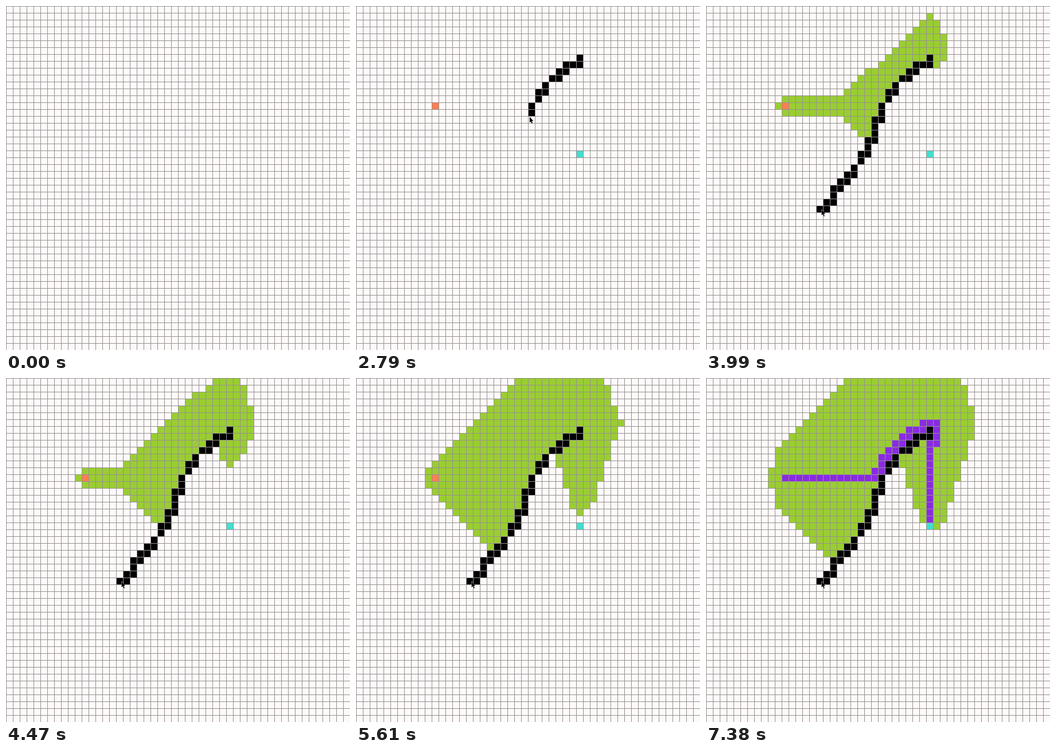
Write an HTML page that moves like this. It is 600 px wide and 600 px high and loops after 7410 ms.

```html
<!DOCTYPE html>
<html lang="en">
<head>
<meta charset="utf-8">
<title>Grid path search</title>
<style>
html, body { margin: 0; width: 100%; height: 100%; overflow: hidden; background: #fffafa; }
svg { display: block; width: 600px; height: 600px; }
</style>
</head>
<body>
<svg viewBox="0 0 600 600">
  <rect width="600" height="600" fill="#fffafa"/>
  <g shape-rendering="crispEdges">
    <path id="open" fill="#9acd32"/>
    <path id="route" fill="#8a2be2"/>
    <path id="wall" fill="#000"/>
    <path id="start" fill="#ff7f50"/>
    <path id="end" fill="#40e0d0"/>
    <path id="grid" fill="none" stroke="#959090"/>
  </g>
  <path id="cursor" d="M0 0V10L2.2 8.2L3.9 12L5.3 11.4L3.7 7.6H6.7Z"
    fill="#000" stroke="#fff" stroke-width=".8" paint-order="stroke"/>
</svg>
<script>
const LOOP = 7410, N = 50, S = 12;
const START_AT = 1140, END_AT = 1740, SEARCH_AT = 3510;
const DRAG = { from: 2430, to: 3260, top: 7, bottom: 29.58 };

const el = id => document.getElementById(id);
const key = (x, y) => y * N + x;
const mix = (a, b, p) => a + (b - a) * p;
const ease = p => { p = Math.min(1, Math.max(0, p)); return p * p * (3 - 2 * p); };
const START = key(11, 14), END = key(32, 21);

// the dragged stroke, in cells
const stroke = [[32.9, 7], [32.3, 8], [28, 11], [26, 14], [24, 19.5], [22, 23], [18.85, 27], [16.8, 29.58]];
function strokeX(y) {
  const i = Math.max(1, stroke.findIndex(p => p[1] >= y));
  const [a, b] = [stroke[i - 1], stroke[i]];
  return mix(a[0], b[0], (y - a[1]) / (b[1] - a[1]));
}

// wall cell -> height at which the stroke first touches it
const walls = new Map();
for (let y = DRAG.top + 1 / 16; y < DRAG.bottom; y += 1 / 8) {
  const n = key(Math.floor(strokeX(y)), Math.floor(y));
  if (!walls.has(n)) walls.set(n, y);
}
const dragY = t => mix(DRAG.top, DRAG.bottom, ease((t - DRAG.from) / (DRAG.to - DRAG.from)));

// Best-first search, ties in order of insertion; the heuristic weighs columns only
function search() {
  const g = new Map([[START, 0]]), from = new Map(), opened = new Map();
  const queue = [{ n: START, f: 0 }], queued = new Set([START]);
  let step = 0;
  while (queue.length) {
    let best = 0;
    queue.forEach((q, i) => { if (q.f < queue[best].f) best = i; });
    const n = queue.splice(best, 1)[0].n;
    queued.delete(n);
    if (n === END) break;
    step++;
    const x = n % N, y = Math.floor(n / N);
    for (const [dx, dy] of [[1, 0], [-1, 0], [0, 1], [0, -1]]) {
      const u = x + dx, v = y + dy, m = key(u, v);
      if (u < 0 || v < 0 || u >= N || v >= N || walls.has(m)) continue;
      const cost = g.get(n) + 1;
      if (g.has(m) && g.get(m) <= cost) continue;
      g.set(m, cost);
      from.set(m, n);
      if (queued.has(m)) continue;
      queue.push({ n: m, f: cost + 2 * Math.abs(u - END % N) });
      queued.add(m);
      if (!opened.has(m)) opened.set(m, step);
    }
  }
  const route = [];
  for (let n = END; from.has(n);) route.push(n = from.get(n));
  return { opened: [...opened], endOpen: opened.get(END), route, steps: step };
}
const found = search();

// pointer stops before the drag: arrive, leave, x, y
const stops = [
  [750, 750, 590, 285], [1110, 1200, 138, 173], [1500, 1500, 307, 259],
  [1700, 1850, 390, 259], [2330, DRAG.from, 32.9 * S, 7 * S]
];
function pointer(t) {
  if (t >= DRAG.from) {
    const y = dragY(t);
    return [strokeX(y) * S, y * S];
  }
  const i = Math.max(1, stops.findIndex(s => s[1] > t));
  const [a, b] = [stops[i - 1], stops[i]];
  const p = ease((t - a[1]) / (b[0] - a[1]));
  return [mix(a[2], b[2], p), mix(a[3], b[3], p)];
}

function paint(id, cells) {
  el(id).setAttribute('d', cells.map(n =>
    `M${n % N * S} ${Math.floor(n / N) * S}h${S}v${S}h-${S}z`).join(''));
}

function draw(t) {
  const k = t < SEARCH_AT ? 0 : Math.max(1, Math.floor(5.5 + (t - SEARCH_AT - 30) * 0.162));
  const walked = Math.max(0, Math.min(found.route.length, k - found.steps));
  const done = walked === found.route.length;
  const reach = dragY(t - 25);
  paint('open', found.opened.filter(o => o[1] <= k).map(o => o[0]));
  paint('route', found.route.slice(0, walked));
  paint('wall', [...walls].filter(w => w[1] <= reach).map(w => w[0]));
  paint('start', t >= START_AT && !done ? [START] : []);
  paint('end', t >= END_AT && (k < found.endOpen || done) ? [END] : []);
  const [x, y] = pointer(t);
  el('cursor').setAttribute('transform', `translate(${x.toFixed(1)} ${y.toFixed(1)})`);
  el('cursor').setAttribute('visibility', t < stops[0][0] ? 'hidden' : 'visible');
}

let lines = '';
for (let p = 0.5; p < N * S; p += S) lines += `M${p} 0V600M0 ${p}H600`;
el('grid').setAttribute('d', lines);

const t0 = performance.now();
function tick() {
  draw((performance.now() - t0) % LOOP);
  requestAnimationFrame(tick);
}
draw(0);
requestAnimationFrame(tick);
</script>
</body>
</html>
```
